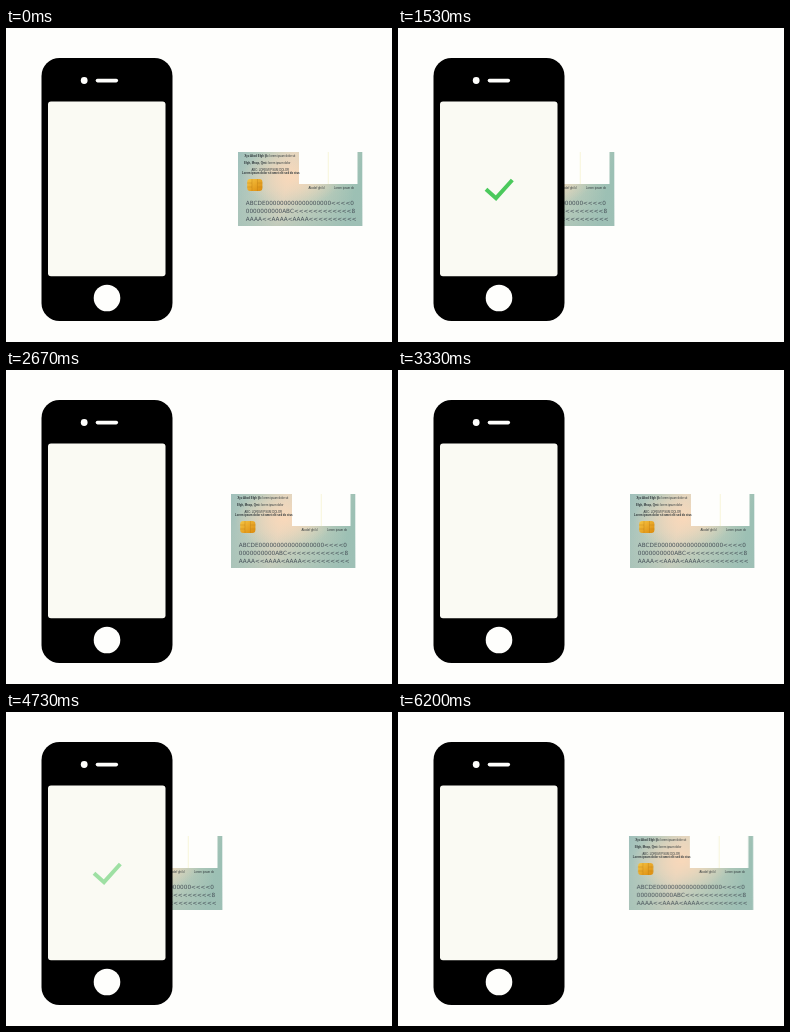
An HTML page for the animation above (6230 ms loop, 386 by 314 pixels).

```html
<!DOCTYPE html>
<html lang="en">
<head>
<meta charset="utf-8">
<title>Card scan</title>
<style>
  html, body { margin: 0; width: 100%; height: 100%; overflow: hidden; background: #fefefc; }
  svg { display: block; width: 386px; height: 314px; }
  .paper { fill: #fefefc; }
  .code { font: 5.72px "DejaVu Sans", sans-serif; fill: #465058; }
  .small { font: 2.8px "Liberation Sans", Arial, sans-serif; fill: #2c3438; }
  .bold { font-weight: bold; }
  #tick { fill: none; stroke: #4bc95c; stroke-width: 4; opacity: 0; }
</style>
</head>
<body>
<svg viewBox="0 0 386 314">
  <defs>
    <linearGradient id="base" x2="1" y2="0.15">
      <stop offset="0" stop-color="#9fc0bb"/>
      <stop offset="0.25" stop-color="#bfcdbd"/>
      <stop offset="0.45" stop-color="#e3d6c0"/>
      <stop offset="0.65" stop-color="#c8d1bd"/>
      <stop offset="1" stop-color="#9cc0b4"/>
    </linearGradient>
    <radialGradient id="glow" cx="0.43" cy="0.34" r="0.4">
      <stop offset="0" stop-color="#f8d8ba"/>
      <stop offset="1" stop-color="#f8d8ba" stop-opacity="0"/>
    </radialGradient>
    <linearGradient id="shade" x2="0" y2="1">
      <stop offset="0.5" stop-color="#a0bfb6" stop-opacity="0"/>
      <stop offset="1" stop-color="#a0bfb6" stop-opacity="0.5"/>
    </linearGradient>
    <linearGradient id="gold" x2="1" y2="1">
      <stop offset="0" stop-color="#f6c544"/>
      <stop offset="1" stop-color="#dc8a0c"/>
    </linearGradient>
  </defs>

  <g id="card">
    <rect width="124.3" height="74" fill="url(#base)"/>
    <rect width="124.3" height="74" fill="url(#shade)"/>
    <rect width="124.3" height="74" fill="url(#glow)"/>
    <rect class="paper" x="61" y="-1" width="58.5" height="33"/>
    <path d="M90.3 0V32" stroke="#f6f3d2" stroke-width="0.8"/>
    <g class="small">
      <text x="6.5" y="4.6"><tspan class="bold">Xyz Abcd Efgh Ijk:</tspan> lorem ipsum dolor sit</text>
      <text x="6" y="11.8"><tspan class="bold">Efgh, Mnop, Qrst:</tspan> lorem ipsum dolor</text>
      <text x="13.5" y="18.6">ABC: LOREM IPSUM DOLOR</text>
      <text x="4" y="22" class="bold">Lorem ipsum dolor sit amet elit sed do eius</text>
      <text x="70.5" y="37">Abcdef ghi kl</text>
      <text x="96" y="37">Lorem ipsum do</text>
    </g>
    <rect x="9.2" y="27" width="15.2" height="12" rx="3" fill="url(#gold)"/>
    <path d="M9 31h5v-4M9 35h5v4M24.5 31h-5v-4M24.5 35h-5v4M14 31v4M19.5 31v4"
      fill="none" stroke="#b87812" stroke-width="0.5" opacity="0.7"/>
    <g class="code" id="code"></g>
  </g>

  <rect x="35.5" y="30" width="131" height="263" rx="18"/>
  <rect x="42" y="73.5" width="117.5" height="174.8" rx="3" fill="#fafaf3"/>
  <g class="paper">
    <circle cx="78.2" cy="52.5" r="3.4"/>
    <rect x="89.7" y="50.8" width="22.4" height="3.6" rx="1.8"/>
    <circle cx="101" cy="270" r="13.3"/>
  </g>
  <path id="tick" d="M88 161.2L98 170.2L114.3 152"/>
</svg>
<script>
  const LOOP = 6230;
  const OUT = 232, IN = 92, TOP = 124;
  const $ = id => document.getElementById(id);

  const lines = [
    "ABCDE" + "0".repeat(18) + "<<<<0",
    "0".repeat(10) + "ABC" + "<".repeat(12) + "8",
    "AAAA<<AAAA<AAAA" + "<".repeat(10)
  ];
  lines.forEach((line, i) => {
    const text = document.createElementNS("http://www.w3.org/2000/svg", "text");
    text.setAttribute("x", 7.8);
    text.setAttribute("y", 52.9 + i * 8.2);
    text.textContent = line;
    $("code").append(text);
  });

  // Each step is [time in ms, value].
  function play(id, steps, easing, style) {
    const frames = steps.map(([time, value]) => ({ offset: time / LOOP, easing, ...style(value) }));
    $(id).animate(frames, { duration: LOOP, iterations: Infinity });
  }

  play("card", [
    [0, OUT], [450, IN], [2292, IN], [2742, OUT],
    [3460, OUT], [3910, IN], [5780, IN], [LOOP, OUT]
  ], "ease-in-out", x => ({ transform: `translate(${x}px, ${TOP}px)` }));

  play("tick", [
    [0, 0], [990, 0], [1490, 1], [2290, 1], [2590, 0],
    [4470, 0], [4970, 1], [5780, 1], [6080, 0], [LOOP, 0]
  ], "linear", opacity => ({ opacity }));
</script>
</body>
</html>
```
